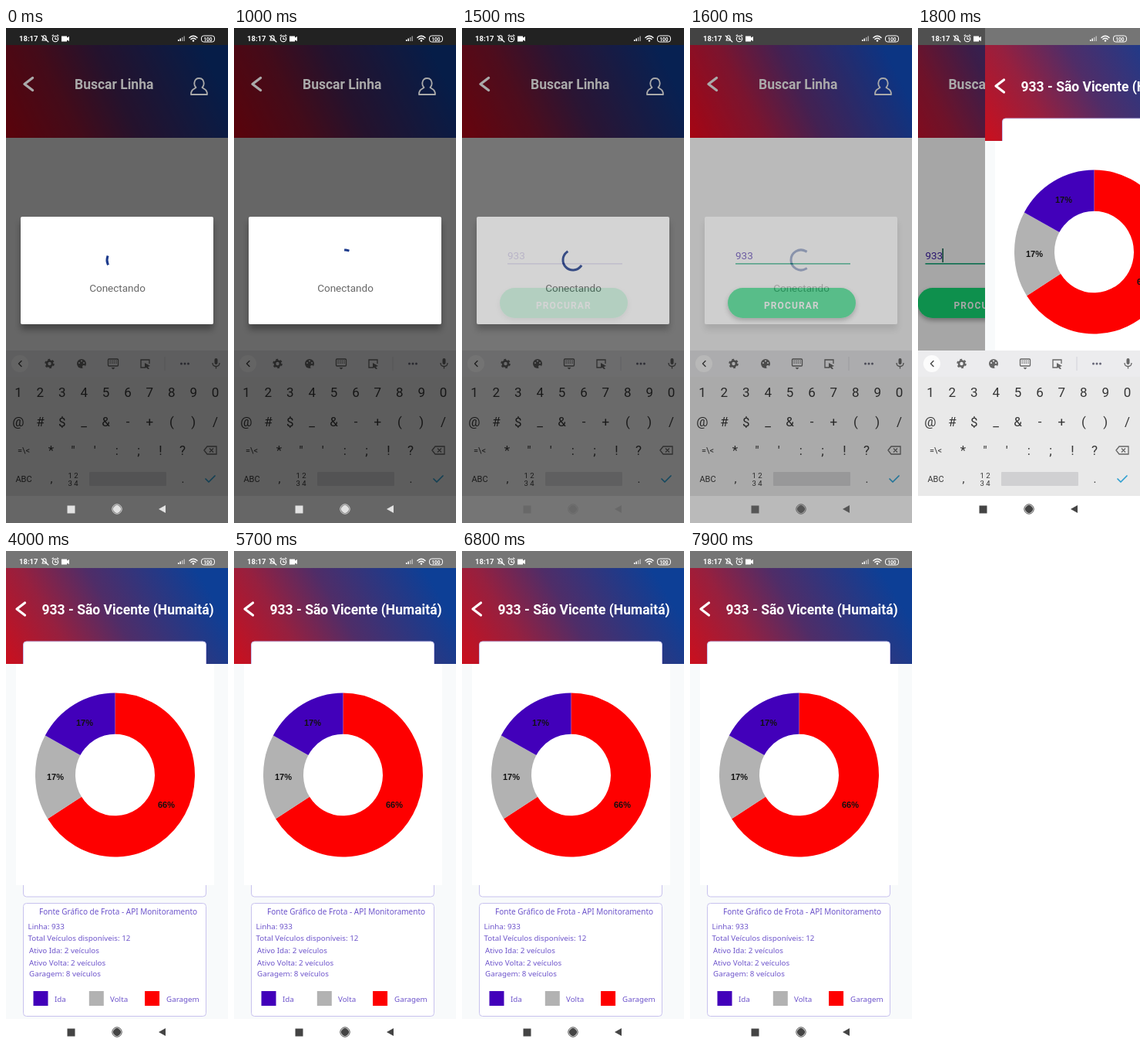
Write an HTML page that moves like this. It is 288 px wide and 640 px high and loops after 8 s.

```html
<!DOCTYPE html>
<html lang="pt">
<head>
<meta charset="utf-8">
<title>Buscar Linha</title>
<style>
  html, body { margin: 0; width: 100%; height: 100%; overflow: hidden; background: #fff; }
  svg { display: block; width: 288px; height: 640px; font-family: Roboto, sans-serif; }
  .line { fill: none; stroke-linecap: round; stroke-linejoin: round; }
  .mid { text-anchor: middle; }
  .title { font-size: 17.5px; font-weight: 700; }
  .info { font-family: "Noto Sans", "Open Sans", sans-serif; font-size: 9.8px; fill: #6d54cb; }
  .share { font: 700 11px "Liberation Sans", sans-serif; fill: #111; text-anchor: middle; }
  .card { fill: #fff; stroke: #c8c2ee; }
  .icon { fill: none; stroke: #666; stroke-width: 1.3; }
  .icon.bold { stroke-width: 2.6; }
</style>
</head>
<body>
<svg viewBox="0 0 288 640">
  <defs>
    <linearGradient id="sky" gradientUnits="userSpaceOnUse" x1="5" y1="146" x2="235" y2="5">
      <stop offset="0" stop-color="#c8101f"/>
      <stop offset=".28" stop-color="#96203f"/>
      <stop offset=".55" stop-color="#4f2d68"/>
      <stop offset="1" stop-color="#0d3f96"/>
    </linearGradient>
    <linearGradient id="dusk" gradientUnits="userSpaceOnUse" x1="5" y1="142" x2="250" y2="20">
      <stop offset="0" stop-color="#e0081c"/>
      <stop offset=".3" stop-color="#a81c40"/>
      <stop offset=".55" stop-color="#5c2d70"/>
      <stop offset="1" stop-color="#1048b4"/>
    </linearGradient>
    <clipPath id="aboveNav"><rect width="288" height="605"/></clipPath>
    <filter id="shade" x="-10%" y="-10%" width="120%" height="140%">
      <feDropShadow dx="0" dy="3" stdDeviation="3" flood-opacity=".35"/>
    </filter>
    <filter id="lift" x="-10%" y="-10%" width="120%" height="130%">
      <feDropShadow dx="0" dy="7" stdDeviation="4.5" flood-opacity=".32"/>
    </filter>
  </defs>

  <g id="search">
    <rect y="142" width="400" height="470" fill="#fff"/>
    <rect width="400" height="142" fill="url(#dusk)"/>
    <text x="59" y="299" font-size="13.5" fill="#3f1fa8">933</text>
    <rect id="underline" x="59" y="304" width="149" height="1.6"/>
    <rect id="caret" x="81" y="285" width="1.5" height="18" fill="#075c48"/>
    <rect x="49" y="336" width="166" height="39" rx="19.5" fill="#18dc76" filter="url(#shade)"/>
    <text x="96" y="363" font-size="12" font-weight="700" letter-spacing="1.1" fill="#fff">PROCURAR</text>
  </g>
  <rect id="pageDim" y="22" width="288" height="583"/>
  <g id="searchHead" fill="#aaa" stroke="#aaa">
    <path class="line" d="M34.500 64.500L24 72.500L34.500 80.500" stroke-width="3.4"/>
    <text class="title" x="89" y="79" stroke="none">Buscar Linha</text>
    <path class="line" stroke-width="1.8" d="M246.500 77C243 74 243.500 65 250.500 65S258 74 254.500 77C258 79.500 261 80 261 86H240C240 80 243 79.500 246.500 77Z"/>
  </g>
  <rect id="status" width="288" height="22"/>

  <g id="result">
    <rect y="22" width="288" height="583" fill="#f8fafb"/>
    <rect width="288" height="146" fill="url(#sky)"/>
    <rect width="288" height="22" fill="#757575"/>
    <path class="line" d="M24.500 67L14 75L24.500 83" stroke="#fff" stroke-width="3.2"/>
    <text class="title" x="46.500" y="82" fill="#fff">933 - São Vicente (Humaitá)</text>
    <rect class="card" x="22.500" y="117" width="237" height="330" rx="4"/>
    <rect x="13" y="146" width="257" height="286" fill="#fff"/>
    <g id="donut" transform="translate(141.500 289.500) scale(1 1.024)"></g>
    <text class="share" x="208" y="332">66%</text>
    <text class="share" x="64" y="296">17%</text>
    <text class="share" x="102" y="226">17%</text>
    <rect class="card" x="22.500" y="455.500" width="237" height="146" rx="4"/>
    <g id="info" class="info"></g>
  </g>

  <g clip-path="url(#aboveNav)"><g id="keyboard">
    <rect y="417" width="288" height="188" fill="#e9e9e9"/>
    <rect y="417" width="288" height="34" fill="#ececee"/>
    <circle cx="18" cy="434" r="11" fill="#fcfcfc"/>
    <path class="line" d="M20 430.500L16.500 434L20 437.500" stroke="#444" stroke-width="1.4"/>
    <circle class="icon bold" cx="56.500" cy="434" r="3.500"/>
    <circle class="icon bold" cx="56.500" cy="434" r="5" stroke-dasharray="2.600 2.636"/>
    <circle cx="98" cy="434" r="6" fill="#666"/>
    <g fill="#ececee"><circle cx="95" cy="433" r="1.100"/><circle cx="98" cy="430.500" r="1.100"/><circle cx="101" cy="433" r="1.100"/><circle cx="101" cy="438" r="2"/></g>
    <rect class="icon" x="132.500" y="428" width="13" height="9" rx="1"/>
    <path class="icon" d="M134.500 430.500H144M134.500 433H144" stroke-dasharray="1.300 1.300"/>
    <path d="M136.500 439H141.500L139 441.500Z" fill="#666"/>
    <path class="icon" d="M180 439H175V429H186V434"/>
    <path d="M180 433L187 437L184 438L186 441L184 441L182 439L180 440Z" fill="#666"/>
    <path d="M206 425V443" stroke="#d2d2d8"/>
    <g fill="#667"><circle cx="227.500" cy="434" r="1.500"/><circle cx="232" cy="434" r="1.500"/><circle cx="236.500" cy="434" r="1.500"/></g>
    <rect x="270.500" y="427" width="4" height="8" rx="2" fill="#666"/>
    <path class="icon" d="M268 433C268 439 277 439 277 433M272.500 437.500V440.500"/>
    <g id="keys" class="mid" fill="#363636"></g>
    <rect x="108" y="574" width="100" height="18" rx="1" fill="#d0d0d2"/>
    <path class="icon" d="M257 546L261 541H273V551H261ZM264 543.500L269 548.500M269 543.500L264 548.500"/>
    <path class="line" d="M259 583L263 587L271 579" stroke="#2f9fd0" stroke-width="1.7"/>
  </g></g>
  <rect y="605" width="288" height="35" fill="#fff"/>
  <rect id="keyDim" y="417" width="288" height="223"/>
  <g id="nav">
    <rect x="80" y="618" width="9" height="9"/>
    <circle cx="144" cy="622" r="4.600"/>
    <circle cx="144" cy="622" r="6.200" fill="none" stroke-width="1"/>
    <path d="M207 617V627L198 622Z" stroke="none"/>
  </g>

  <g fill="#fff">
    <text x="17" y="17" font-size="9.500" font-weight="700">18:17</text>
    <g class="line" stroke="#fff" stroke-width="1.1">
      <path d="M47 16H53L52 14V12C52 9 48 9 48 12V14ZM46 10L55 18"/>
      <circle cx="64" cy="14" r="3.700"/>
      <path d="M64 12V14.500H66M60 10L61.500 9M68 10L66.500 9"/>
    </g>
    <path d="M72 10.500H79V12.500L82 11V17L79 15.500V17.500H72Z"/>
    <path d="M223 17V15H224.500V17ZM225.500 17V13.500H227V17Z"/>
    <path d="M228 17V12H229.500V17ZM230.500 17V10.500H232V17Z" opacity=".5"/>
    <g class="line" stroke="#fff" stroke-width="1.5"><path d="M238 12.500Q243 8 248 12.500M240 14.500Q243 12 246 14.500"/></g>
    <circle cx="243" cy="16.500" r="1.200"/>
    <rect x="253.500" y="10" width="17" height="8" rx="3" fill="none" stroke="#fff"/>
    <text class="mid" x="262" y="16.500" font-size="6.500" font-weight="700">100</text>
  </g>

  <g id="dialog">
    <rect x="19" y="244" width="250" height="139" rx="2" fill="#fff" filter="url(#lift)"/>
    <path id="spinner" transform="translate(144 300)" fill="none" stroke="#1c3a8c" stroke-width="3" stroke-linecap="square"/>
    <text class="mid" x="144.500" y="341" font-size="13.500" fill="#686868">Conectando</text>
  </g>
</svg>
<script>
const LOOP = 8000, STEP = 100;
const el = id => document.getElementById(id);
const set = (id, name, value) => el(id).setAttribute(name, value);
const add = (parent, tag, attrs, text = "") => {
  const node = document.createElementNS("http://www.w3.org/2000/svg", tag);
  for (const name in attrs) node.setAttribute(name, attrs[name]);
  node.textContent = text;
  el(parent).append(node);
};

// Clockwise from twelve o'clock, in degrees.
const polar = (r, deg) => {
  const a = deg * Math.PI / 180;
  return `${(r * Math.sin(a)).toFixed(2)} ${(-r * Math.cos(a)).toFixed(2)}`;
};
const arc = (r, from, to) =>
  `M${polar(r, from)}A${r} ${r} 0 ${+(Math.abs(to - from) > 180)} 1 ${polar(r, to)}`;

let angle = 0;
for (const [share, color] of [[66, "#fe0000"], [17, "#b2b2b2"], [17, "#4200ba"]]) {
  const end = angle + share * 3.6;
  add("donut", "path", { d: arc(77.5, angle, end), fill: "none", stroke: color, "stroke-width": 52 });
  angle = end;
}

const label = (x, y, text, size = 9.8) => add("info", "text", { x, y, style: `font-size:${size}px` }, text);
label(43, 470, "Fonte Gráfico de Frota - API Monitoramento", 10);
label(28.5, 489, "Linha: 933");
label(28.5, 504, "Total Veículos disponíveis: 12");
label(30, 520, "Ativo Ida: 2 veículos");
label(30, 535.5, "Ativo Volta: 2 veículos");
label(30, 550, "Garagem: 8 veículos");
[["Ida", "#4200ba", 63], ["Volta", "#b2b2b2", 135], ["Garagem", "#fe0000", 208]].forEach(([name, fill, x], i) => {
  add("info", "rect", { x: 35.5 + 72.3 * i, y: 569, width: 19, height: 19, fill });
  label(x, 582.5, name);
});

const key = (x, y, text, size = 17) => add("keys", "text", { x, y, "font-size": size }, text);
const row = (chars, first, y) => [...chars].forEach((c, i) => key(first + 28.4 * i, y, c));
row("1234567890", 16, 477);
row("@#$_&-+()/", 16, 515);
row("*\"':;!?", 58.5, 552);
key(23, 550, "=\\<", 11);
key(23, 587, "ABC", 11);
key(59, 588, ",", 15);
key(87, 582, "1 2", 9.5);
key(87, 592, "3 4", 9.5);
key(229.5, 588, ".", 15);

// Linear interpolation through [time, value] pairs.
const track = points => t => {
  const i = points.findIndex(p => p[0] > t);
  if (i < 0) return points[points.length - 1][1];
  if (!i) return points[0][1];
  const [t0, a] = points[i - 1], [t1, b] = points[i];
  return a + (b - a) * (t - t0) / (t1 - t0);
};
const dimAt = track([[1400, .6], [1500, .54], [1600, .27], [1700, 0]]);
const dialogAt = track([[1400, 1], [1500, .69], [1600, .3], [1700, 0]]);
const slideAt = track([[1600, 288], [1700, 215], [1800, 87], [1900, 22], [2000, 5], [2100, 1], [2200, 0]]);
const keyboardAt = track([[1800, 0], [1900, 70], [2000, 188]]);
const statusAt = track([[1500, 34], [1700, 100], [1800, 80]]);
const navAt = track([[1400, 226], [1500, 104], [1700, 68]]);
const gray = v => `rgb(${v},${v},${v})`;

// Ease out for the arc's head over the first half of its cycle, ease in-out for the tail over the second.
const bezier = (x, x1, x2) => {
  let lo = 0, hi = 1;
  for (let i = 0; i < 20; i++) {
    const s = (lo + hi) / 2, q = 1 - s;
    if (3 * x1 * s * q * q + 3 * x2 * s * s * q + s * s * s < x) lo = s; else hi = s;
  }
  return lo * lo * (3 - 2 * lo);
};
const spinnerPath = t => {
  const CYCLE = 1333, p = ((t + 140) % CYCLE) / CYCLE;
  const head = p < .5 ? bezier(p * 2, .4, .2) : 1;
  const tail = p < .5 ? 0 : bezier(p * 2 - 1, .4, .2);
  const turn = 238 + t * .153 + p * 90;
  return arc(13, turn + tail * 270, turn + Math.max(head * 270, tail * 270 + 2));
};

function draw(t) {
  const dim = dimAt(t), x = slideAt(t), open = 1 - x / 288;
  const shift = `translate(${-71 * open} 0)`;
  set("search", "transform", shift);
  set("searchHead", "transform", shift);
  set("result", "transform", `translate(${x} 0)`);
  set("pageDim", "opacity", Math.max(dim, open * .5));
  set("keyDim", "opacity", dim);
  set("keyboard", "transform", `translate(0 ${keyboardAt(t)})`);
  set("underline", "fill", t < 1600 ? "#7b62c8" : "#12a878");
  set("caret", "opacity", +(t >= 1700));
  set("status", "fill", gray(statusAt(t)));
  set("nav", "fill", gray(navAt(t)));
  set("nav", "stroke", gray(navAt(t)));
  set("dialog", "opacity", dialogAt(t));
  set("spinner", "d", spinnerPath(t));
}

const start = performance.now();
function tick() {
  const t = (performance.now() - start) % LOOP;
  draw(Math.floor(t / STEP) * STEP);
  requestAnimationFrame(tick);
}
tick();
</script>
</body>
</html>
```
